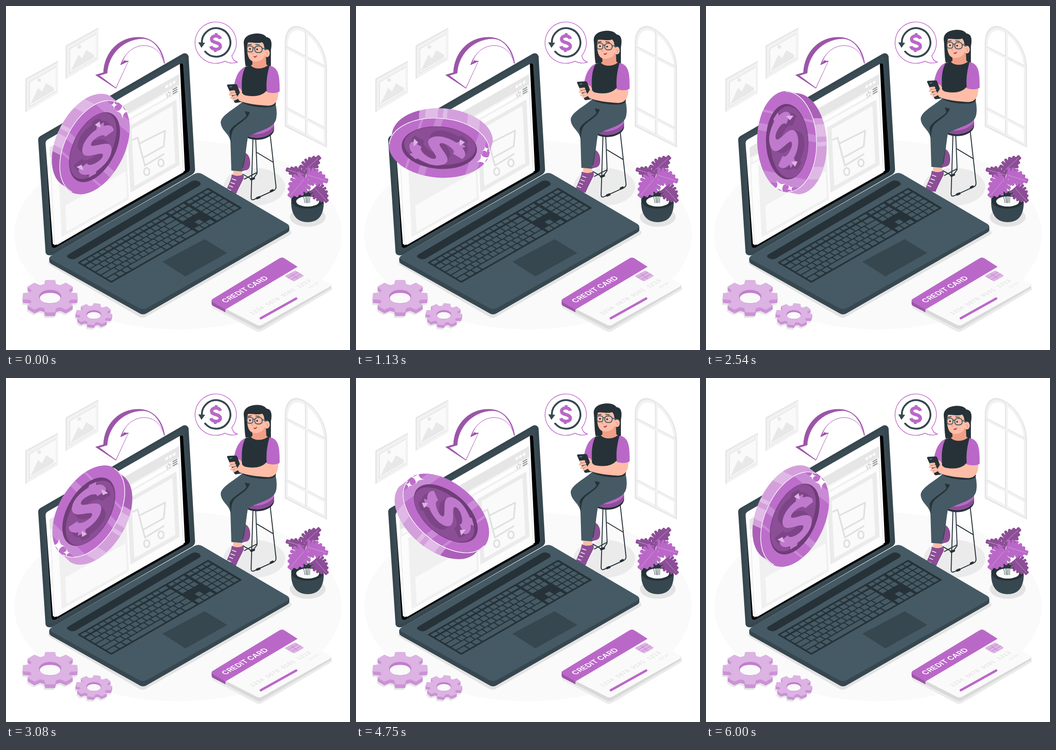
These frames come from a looping animation (748 by 748 pixels, 6040 ms). An HTML page:

```html
<!DOCTYPE html>
<html lang="en">
<head>
<meta charset="utf-8">
<title>Online refund</title>
<style>
html,body{margin:0;width:100%;height:100%;overflow:hidden;background:#fff}
svg{display:block;width:100vw;height:100vh}
.ln{fill:none;stroke-linecap:round;stroke-linejoin:round}
</style>
</head>
<body>
<svg viewBox="0 0 748 748">
<defs>
  <linearGradient id="rim">
    <stop offset=".27" stop-color="#ab60b8"/><stop offset=".27" stop-color="#d4a0dc"/>
    <stop offset=".33" stop-color="#d4a0dc"/><stop offset=".33" stop-color="#e0bce6"/>
    <stop offset=".45" stop-color="#e0bce6"/><stop offset=".45" stop-color="#d4a0dc"/>
    <stop offset=".5" stop-color="#d4a0dc"/><stop offset=".5" stop-color="#e0bce6"/>
    <stop offset=".54" stop-color="#e0bce6"/><stop offset=".54" stop-color="#d4a0dc"/>
    <stop offset=".74" stop-color="#d4a0dc"/><stop offset=".74" stop-color="#dfb9e5"/>
    <stop offset=".86" stop-color="#dfb9e5"/><stop offset=".86" stop-color="#d4a0dc"/>
  </linearGradient>
  <clipPath id="faceClip"><ellipse rx="110" ry="65"/></clipPath>
  <g id="usd" class="ln" style="stroke-linecap:butt">
    <path d="M10-8C8-17-9-16-9-7.500C-9 2 10-2 10 8C10 17-8 17-10.500 8" stroke-width="7.200"/>
    <path d="M1-12V-20.500M-1 12V20.500" stroke-width="6"/>
  </g>
  <path id="star" d="M0-16Q1-1 14 0Q1 1 0 16Q-1 1-14 0Q-1-1 0-16Z" fill="#fff"/>
  <g id="pic">
    <path d="M42 158L113 119V189L42 231Z" fill="#e6e6e6"/>
    <path d="M45 160L113 122V189L45 229Z" fill="#f2f2f2"/>
    <path d="M50 165L108 132V186L50 220Z" fill="#e6e6e6"/>
    <path d="M52 166L108 134V184L52 217Z" fill="#fafafa"/>
    <path d="M53 214L70 178L78 186L87 168L104 178V184Z" fill="#e8e8e8"/>
    <circle cx="72" cy="161" r="4" fill="#e8e8e8"/>
  </g>
</defs>

<ellipse cx="374" cy="497" rx="356" ry="206" fill="#fafafa"/>
<use href="#pic"/><use href="#pic" x="87.5" y="-72"/>

<!-- window -->
<path d="M606 262V80C606 54 620 38 640 45C673 57 698 98 698 135V308Z" fill="#e6e6e6"/>
<path d="M609 260V82C609 56 622 42 642 49C673 60 695 99 695 135V304Z" fill="#f2f2f2"/>
<path d="M613 256V84C613 62 624 49 640 54C668 64 691 101 691 135V297Z" fill="#fff"/>
<path class="ln" d="M653 56V277M612 91L692 132M612 224L692 266" stroke="#e6e6e6" stroke-width="6"/>
<path class="ln" d="M654 56V277M612 92L692 133M612 225L692 267" stroke="#f2f2f2" stroke-width="4"/>

<!-- bubble -->
<path d="M491 108A45 45 0 1 0 476 120Q490 127 503 122Q493 119 491 108Z" fill="#fff" stroke="#ba68c8" stroke-width="1.4"/>
<path class="ln" d="M426 82A31 31 0 1 1 433 99" stroke="#37474f" stroke-width="4"/>
<path d="M418 79L433 80L425 91Z" fill="#37474f"/>
<use href="#usd" x="456" y="79.5" stroke="#ba68c8"/>

<!-- curved arrow -->
<path d="M195 150L212 145C214 100 246 67 290 68C322 69 341 94 345 125C338 98 320 86 300 86C278 86 258 102 252 125L266 119L239 179Z" fill="#9a56a6" stroke="#9a56a6"/>
<path d="M203 151L220 146C222 108 252 73 296 71C322 71 338 96 344 125C337 98 320 86 300 86C278 86 258 102 249 128L266 120L239 178Z" fill="#fff" stroke="#ba68c8"/>
<path d="M249 128L257 118L266 120Z" fill="#9a56a6"/>

<ellipse cx="540" cy="393" rx="67" ry="41" fill="#ebebeb"/>

<!-- woman on stool -->
<g id="woman">
  <g class="ln" stroke="#263238" stroke-width="2">
    <path d="M543 288L546 362L512 380M546 319L581 340M537 288L533 417Q533 423 539 421L583 401Q588 398 587 392L574 276M515 366L536 378L546 364"/>
    <path d="M546 418L551 416M576 403L580 401M533 377L539 375" stroke-width="5"/>
  </g>
  <path d="M525 287C550 298 583 286 583 268V252L530 268Z" fill="#263238"/>
  <path d="M525 283C550 293 582 282 583 264V250L530 268Z" fill="#ba68c8"/>
  <path d="M525 283C550 293 582 282 583 264V260C572 276 548 282 529 278Z" fill="#8c4e96"/>
  <path d="M513 350L524 352L521 362L511 364Z" fill="#fafafa"/>
  <path d="M521 320C532 325 533 345 529 352C526 358 520 357 513 360C511 348 517 334 521 320Z" fill="#8c4e96"/>
  <path d="M529 228L585 214C592 240 588 258 572 261C550 268 530 268 526 285C522 305 521 330 516 352L504 350L500 250Z" fill="#37474f"/>
  <path d="M494 352L513 352L513 374L494 374Z" fill="#ffbda7"/>
  <path d="M515 208C497 224 465 239 467 255C469 272 486 278 488 295L490 358L513 360C517 330 524 305 525 286C545 271 582 269 587 246C590 232 588 222 586 212Z" fill="#455a64"/>
  <path d="M519 229L530 231C527 246 508 254 498 264C490 272 490 282 489 296L486 274C490 260 512 252 523 239Z" fill="#263238"/>
  <path d="M491 366C499 371 509 370 516 366C520 378 511 388 503 408L499 412L476 410C480 394 490 381 491 366Z" fill="#8c4e96"/>
  <path class="ln" d="M517 377C512 387 507 396 501 410" stroke="#fff" stroke-width="1.800"/>
  <path class="ln" d="M492 376L500 379M489 384L497 387M486 391L493 394M482 398L489 401" stroke="#fff" stroke-width="1.500"/>

  <path d="M517 82C516 66 531 60 547 60C557 60 564 64 566 68C578 69 579 82 576 96L576 132L521 131C518 115 519 98 517 82Z" fill="#263238"/>
  <path d="M535 114L565 106L566 127L571 131C562 142 538 140 531 131L536 127Z" fill="#f29f87"/>
  <path d="M521 132L533 130C540 138 558 138 568 130L573 130C580 150 580 165 577 190L587 208C588 220 575 222 550 220C530 218 515 213 512 207L513 185C508 160 512 142 521 132Z" fill="#263238"/>
  <path d="M521 132C506 138 499 155 496 173C500 183 507 186 513 184C512 165 513 147 521 132Z" fill="#ba68c8"/>
  <path d="M497 173L511 181L511 192L497 200L488 190Z" fill="#ffbda7"/>
  <path d="M482 171L499 170Q502 170 503 173L515 206Q515 209 512 209L500 211Q497 211 496 208L481 174Q480 172 482 171Z" fill="#263238"/>
  <path class="ln" d="M487 176L491 175.500" stroke="#607d8b" stroke-width="2"/>
  <path d="M592 186C593 205 586 217 569 217C548 216 526 213 508 207L502 199L512 183C512 190 516 194 523 195C540 198 556 196 566 185Z" fill="#ffbda7"/>
  <path class="ln" d="M488 187L496 186M487 193L498 191M490 200L500 196M495 204L503 200" stroke="#ffbda7" stroke-width="5"/>
  <path d="M573 130C594 134 595 154 595 186C588 191 574 190 567 187C565 165 568 148 573 130Z" fill="#ba68c8"/>

  <path d="M524 76H562L563 100C565 115 552 122 540 121C527 120 523 106 524 76Z" fill="#ffbda7"/>
  <path d="M518 90C517 70 533 62 548 62C566 62 576 74 575 94L564 97C560 90 563 85 557 79C546 83 534 78 526 80C523 90 524 103 526 114L520 114Z" fill="#263238"/>
  <ellipse cx="567.500" cy="103" rx="6" ry="8.500" fill="#ffbda7"/>
  <path class="ln" d="M536 98L534 104L538 104M565 101Q570 102 568 107" stroke="#eb8d78" stroke-width="1.2"/>
  <path d="M538 109Q542 111 546 107Q545 114 539 112Z" fill="#b6404d"/>
  <path class="ln" d="M526 85L533 83.500M543 84L551 85" stroke="#263238" stroke-width="1.600"/>
  <circle cx="530.500" cy="93.500" r="1.900" fill="#263238"/><circle cx="546" cy="94.500" r="1.900" fill="#263238"/>
  <g fill="none" stroke="#455a64" stroke-width="2"><rect x="524" y="87" width="13" height="13" rx="5"/><rect x="541" y="87.500" width="16" height="14" rx="6"/><path d="M537 92Q539 90 541 92M557 92L568 95"/></g>
</g>

<!-- laptop -->
<path d="M93 556L410 380L426 380L618 488Q624 493 618 497L304 676Q298 680 290 676L98 565Q90 560 93 556Z" fill="#e3e3e3"/>
<path d="M70 292Q69 286 76 282L384 104Q393 100 397 109L411 354Q412 362 404 367L102 541Q89 545 86 536Z" fill="#37474f"/>
<path d="M76 294Q76 288 81 285L381 112Q389 109 390 116L404 354Q404 361 398 364L104 533Q93 537 92 529Z" fill="#455a64" opacity=".25"/>
<path d="M86 299Q86 293 91 290L378 126Q384 123 385 128L400 352Q400 359 396 361L108 525Q100 528 99 520Z" fill="#000"/>
<path d="M86 299Q86 293 91 290L378 126L389 358L112 519L102 518Z" fill="#fff"/>
<g transform="matrix(1 -.567 .05 1 95 308)">
  <rect width="280" height="212" fill="#fcfcfc" stroke="#e0e0e0"/>
  <rect width="280" height="22" fill="#e6e6e6"/>
  <rect y="22" width="280" height="15" fill="#f5f5f5"/>
  <path d="M0 37H280" stroke="#e0e0e0"/>
  <rect x="6" y="26" width="246" height="7" rx="3" fill="#fff"/>
  <rect x="16" y="49" width="146" height="155" fill="#f0f0f0"/>
  <rect x="27" y="141" width="131" height="57" fill="#fafafa"/>
  <rect x="170.500" y="54.500" width="98" height="133" fill="#fafafa" stroke="#ebebeb" stroke-width="9"/>
  <g fill="#fff"><circle cx="254" cy="11" r="3"/><circle cx="262" cy="11" r="3"/><circle cx="270" cy="11" r="3"/></g>
  <path d="M266 25H276M266 29.500H276M266 34H276" stroke="#78868c" stroke-width="2"/>
  <path d="M257 24L258.500 28L262 28L259 31L260 35L257 33L254 35L255 31L252 28L255.500 28Z" fill="#fff" stroke="#c7c7c7"/>
</g>
<g class="ln" stroke="#e0e0e0" stroke-width="3.500"><path d="M276 291L286 286L302 347L343 322M290 299L346 271L343 305L298 330"/><ellipse cx="306" cy="360" rx="6" ry="8"/><ellipse cx="337" cy="341" rx="6" ry="8"/></g>

<path d="M94 547L298 640L616 479V487Q616 490 611 493L306 668Q298 673 290 668L99 561Q94 558 94 554Z" fill="#37474f"/>
<path d="M98 543L410 365Q418 361 426 365L612 474Q619 479 612 484L306 657Q298 661 290 657L98 551Q92 547 98 543Z" fill="#455a64"/>
<path d="M136 540L404 381Q412 377 420 382Q427 387 420 391L152 549Q144 553 136 548Q129 544 136 540Z" fill="#263238"/>
<g id="keys" transform="matrix(.868 -.497 .86 .512 155 558)"><rect width="328" height="86" rx="2" fill="#263238"/></g>
<path d="M340 556L432 507L481 537L390 588Z" fill="#37474f"/>

<!-- coin -->
<g id="coin">
  <g transform="translate(192.500 307)">
    <g transform="rotate(-63)">
      <path d="M-110 0L-105-21A110 65 0 0 1 115-21L110 0A110 65 0 0 1-110 0Z" fill="url(#rim)"/>
      <ellipse rx="110" ry="65" fill="#bd6ecb"/>
      <g clip-path="url(#faceClip)" fill="#fff" opacity=".2"><path d="M-44 64L-12-64H4L-28 64ZM-75 64L-43-64H-38L-70 64ZM58 64L90-64H112L80 64Z"/></g>
      <path class="ln" d="M-109 0A109 64 0 0 1 109 0" stroke="#fff" stroke-width="1.400"/>
      <ellipse rx="82" ry="46" fill="#6f3d78"/>
      <ellipse cx="1" cy="-4" rx="78" ry="41" fill="#8c4e96"/>
    </g>
    <g id="relief"></g>
  </g>
  <use href="#star" x="253" y="229"/>
  <use href="#star" transform="translate(235 215) scale(.55)"/>
</g>

<!-- plant -->
<ellipse cx="656" cy="459" rx="39" ry="21" fill="#e3e3e3"/>
<path d="M620 426C620 454 632 470 656 470C680 470 691 454 691 426Z" fill="#37474f"/>
<ellipse cx="655.500" cy="422" rx="35.500" ry="19" fill="#263238"/>
<ellipse cx="656" cy="425" rx="25" ry="11" fill="#fafafa"/>
<path class="ln" d="M653 428Q649 400 648 366M655 428Q652 390 655 350M657 428Q656 390 672 365M660 428Q658 405 676 398M650 428Q648 410 638 400" stroke="#37474f"/>
<g id="plant"></g>

<!-- card -->
<path d="M447 650L598 556L708 612Q711 617 704 620L558 706Q551 711 544 707L449 657Z" fill="#ebebeb"/>
<path d="M447 640L600 560L707 606V613L556 701Q551 704 545 701L450 652Q447 650 447 647Z" fill="#d9d9d9"/>
<path d="M451 636L594 549Q600 545 606 549L703 602Q710 607 703 611L557 693Q551 696 545 693L451 645Q443 640 451 636Z" fill="#fafafa"/>
<path d="M447 641L477 658V666L450 652Q447 650 447 647Z" fill="#9a56a6"/>
<path d="M451 636L594 549Q600 545 606 549L634 567L477 660L451 645Q443 640 451 636Z" fill="#ba68c8"/>
<text transform="matrix(.866 -.49 .866 .5 477 646)" font-family="Inter,sans-serif" font-weight="600" font-size="16.300" fill="#fff">CREDIT CARD</text>
<g font-family="Liberation Mono,monospace" fill="#dcdcdc">
  <text transform="matrix(.866 -.5 .866 .5 536 672)" font-size="13">1234 5678 9101 1213</text>
  <text transform="matrix(.866 -.5 .866 .5 661 614)" font-size="7.500">12/23</text>
</g>
<path class="ln" d="M554 679L631 636" stroke="#ba68c8" stroke-width="5"/>
<path d="M608 586L627 576Q629 575 631 576L646 585Q648 587 646 588L628 598Q626 599 624 598L608 589Q606 587 608 586Z" fill="#dcb3e3"/>
<path class="ln" d="M614 591L634 579M620 595L641 583M619 582L635 593" stroke="#ba68c8" stroke-width=".8"/>

<g id="gears"></g>
</svg>
<script>
const $ = id => document.getElementById(id);
const LOOP = 6040, BOB = LOOP / 4;

// keyboard
const key = (u, v, w, h) => `<rect x="${u}" y="${v}" width="${w}" height="${h}" rx="1" fill="#455a64"/>`;
let keys = '';
for (let r = 0; r < 6; r++) {
  const v = r ? 3 + r * 13.6 : 4, h = r ? 11 : 8;
  if (r == 5) {
    [[4, 18], [25, 13], [41, 13], [57, 82], [142, 13], [158, 13], [174, 13], [190, 27]].forEach(k => keys += key(k[0], v, k[1], h));
  } else {
    const lead = [13, 13, 20, 24, 31][r];
    keys += key(4, v, lead, h);
    let u = 6.5 + lead;
    for (; u + 29 < 217; u += 14.9) keys += key(u, v, 12.4, h);
    keys += key(u, v, 217 - u, h);
  }
  for (let c = 0; c < 3; c++) if (r < 3 || r == 5 || (r == 4 && c == 1)) keys += key(223 + c * 14, v, 11.5, h);
  for (let c = 0; c < 4; c++) keys += key(269 + c * 14.2, v, 11.7, h);
}
$('keys').innerHTML += keys;

// raised dollar sign on the coin, with two lit ends
let relief = '';
for (let i = 10; i >= 0; i--)
  relief += `<use href="#usd" transform="matrix(2.6 -1.4 -.3 2.65 ${4 - i} ${6 - i})" stroke="${i ? '#7d4587' : '#c07acd'}"/>`;
$('relief').innerHTML = relief +
  '<path d="M1-49L11-56L13-43L4-46ZM-39 43L-28 38L-24 50L-33 47Z" fill="#dcb3e3"/>';

// monstera leaves: curved fingers on a midrib
function leaf(x, y, angle, len, wide, color) {
  let d = '';
  for (let i = 0; i <= 5; i++) {
    const m = i / 5, w = wide * Math.sin(Math.PI * (.3 + .66 * m));
    for (const s of [-1, 1])
      d += `M${m * len * .75} 0Q${m * len * .75} ${s * w * .7} ${len * (m * .98 - .05)} ${s * w * .9}`;
  }
  return `<g transform="translate(${x} ${y}) rotate(${angle})">
    <ellipse cx="${len * .42}" rx="${len * .45}" ry="${wide * .72}" fill="${color}"/>
    <path class="ln" d="${d}" stroke="${color}" stroke-width="${len / 6.6}"/>
    <path d="M0 0H${len * .9}" stroke="#dcb3e3" stroke-width=".7"/></g>`;
}
$('plant').innerHTML =
  leaf(651, 356, -42, 43, 17, '#8c4e96') +
  leaf(649, 367, 197, 42, 13, '#8c4e96') +
  leaf(673, 397, 48, 39, 18, '#8c4e96') +
  leaf(657, 368, 17, 45, 18, '#ba68c8') +
  leaf(648, 377, 130, 50, 23, '#ba68c8');

// gears
function gear(x, y, R, turn, depth) {
  let pts = [];
  for (let i = 0; i < 8; i++)
    for (const [a, r] of [[-.27, .76], [-.17, 1], [.17, 1], [.27, .76]]) {
      const t = turn + i * Math.PI / 4 + a;
      pts.push([x + R * r * Math.cos(t), y + R * r * .59 * Math.sin(t)].map(n => n.toFixed(1)));
    }
  const body = (dx, dy, c) => `<polygon points="${pts.join(' ')}" transform="translate(${dx} ${dy})" fill="${c}" stroke="${c}" stroke-width="2" stroke-linejoin="round"/>`;
  let s = body(-2, depth + 4, '#e6e6e6');
  for (let i = depth; i > 0; i--) s += body(0, i, '#cb92d5');
  const hole = (cy, rx, ry, c) => `<ellipse cx="${x}" cy="${cy}" rx="${rx}" ry="${ry}" fill="${c}"/>`;
  return s + body(0, 0, '#dcb3e3') + hole(y + 1, R * .41, R * .25, '#c17ecd') + hole(y + 1 + R * .05, R * .38, R * .19, '#fafafa');
}
$('gears').innerHTML = gear(96, 631, 59, 0, 8) + gear(191, 670, 39, .18, 6);

function draw(now) {
  const t = now % LOOP;
  $('coin').setAttribute('transform', `rotate(${t / LOOP * 360} 186 299)`);
  const p = (t / BOB + .03) % 1;
  const lift = 15.5 * (1 - Math.abs(2 * p - 1));
  $('woman').setAttribute('transform', `translate(0 ${.7 - lift})`);
}
const start = performance.now();
(function tick() {
  draw(performance.now() - start);
  requestAnimationFrame(tick);
})();
</script>
</body>
</html>
```
